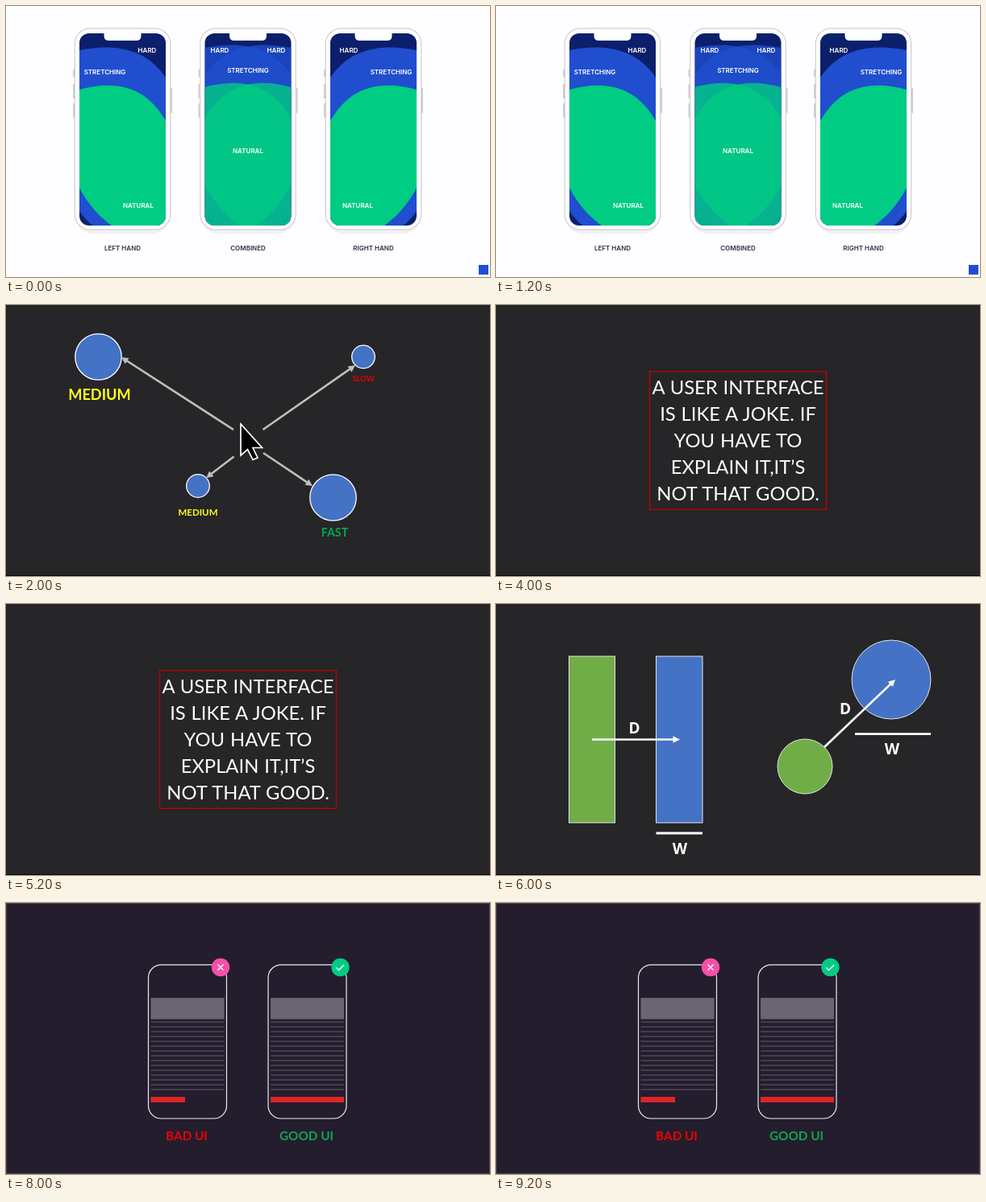
An HTML page that plays this animation: 600x337 px, repeating every 10 s.

```html
<!DOCTYPE html>
<html lang="en">
<head>
<meta charset="utf-8">
<title>Touch interface slides</title>
<style>
  html, body { margin: 0; width: 100%; height: 100%; overflow: hidden; background: #262527; }
  svg { display: block; width: 100vw; height: 100vh; }
  text { text-anchor: middle; font-family: Lato, Carlito, sans-serif; }
  .bold text { font-weight: 700; }
  .zones text { font: 600 8px Inter, sans-serif; }
  .sizes text { font: 700 19px "Open Sans", sans-serif; }
</style>
</head>
<body>
<svg id="stage" viewBox="0 0 600 337"></svg>
<script>
const SLIDE_MS = 2000;
const DARK = '#262527', BLUE = '#4472c4', GREEN = '#00cc83', ROYAL = '#204ecf';

const rect = (x, y, w, h, fill, more = '') =>
  `<rect x="${x}" y="${y}" width="${w}" height="${h}" fill="${fill}" ${more}/>`;
const circle = (x, y, r, fill, more = '') =>
  `<circle cx="${x}" cy="${y}" r="${r}" fill="${fill}" ${more}/>`;
const text = (x, y, label, fill = '#fff', more = '') =>
  `<text x="${x}" y="${y}" fill="${fill}" ${more}>${label}</text>`;
const path = (d, fill, more = '') => `<path d="${d}" fill="${fill}" ${more}/>`;
const line = (d, color, width) => path(d, 'none', `stroke="${color}" stroke-width="${width}"`);
const backdrop = color => rect(0, 0, 600, 337, color);
const darkBackdrop = backdrop(DARK) + rect(0, 336, 600, 1, '#080808');

// Straight arrow whose head ends exactly at (x2, y2).
function arrow(x1, y1, x2, y2, color, width) {
  const length = Math.hypot(x2 - x1, y2 - y1);
  const angle = Math.atan2(y2 - y1, x2 - x1) * 180 / Math.PI;
  return `<g transform="translate(${x1} ${y1}) rotate(${angle})">` +
    line(`M0 0H${length - 6}`, color, width) +
    path(`M${length} 0l-8.5 -4.3v8.6z`, color) + '</g>';
}

// Thumb zones, measured from the middle of the phone; side -1 mirrors them.
function zone(d, fill, side, opacity, dy) {
  return path(d, fill, `transform="translate(0 ${dy}) scale(${side} 1)" opacity="${opacity}"`);
}
const STRETCH = 'M-53.5 55C-14.5 47 27.5 50 53.5 89V280H-28C-38 273 -47 265 -53.5 255Z';
const NATURAL = 'M-53.5 104C-14.5 93 27.5 96 53.5 143V280H-2.5C-24.5 268 -42.5 248 -53.5 226Z';

function zonePhone(x, sides, caption, labels) {
  const both = sides.length > 1;
  const opacity = both ? 0.8 : 1, dy = both ? -3 : 0;
  const zones = [[STRETCH, ROYAL], [NATURAL, GREEN]]
    .map(([d, fill]) => sides.map(side => zone(d, fill, side, opacity, dy)).join('')).join('');
  const buttons = [[-61.5, 79, 9], [-61.5, 97, 18], [-61.5, 121, 18], [59.5, 102, 31]]
    .map(([bx, by, h]) => rect(bx, by, 2, h, '#cfcdd3')).join('');
  return `<g transform="translate(${x} 0)">` +
    rect(-57, 40, 114, 243, '#f1f0f4', 'rx="19"') + buttons +
    rect(-59.2, 27.8, 118.4, 250.4, '#fff', 'rx="19" stroke="#cfcdd3" stroke-width="1.2"') +
    `<g clip-path="url(#screen)">${rect(-54, 33, 108, 241, '#0c1f6a')}${zones}</g>` +
    path('M-23 33V37Q-23 43 -17 43H17Q23 43 23 37V33Z', '#fff') +
    labels.map(([lx, y, label]) => text(lx, y, label)).join('') +
    text(0, 304, caption, '#2b3246') + '</g>';
}

function zonesSlide() {
  const single = side => [[30.5 * side, 58, 'HARD'], [-22 * side, 85, 'STRETCHING'], [19.5 * side, 251, 'NATURAL']];
  return '<g class="zones">' + backdrop('#fefdff') +
    '<clipPath id="screen"><rect x="-53.5" y="34" width="107" height="239" rx="12"/></clipPath>' +
    zonePhone(144.5, [1], 'LEFT HAND', single(1)) +
    zonePhone(300, [1, -1], 'COMBINED',
      [[-35, 58, 'HARD'], [35, 58, 'HARD'], [0, 82.5, 'STRETCHING'], [0, 182.5, 'NATURAL']]) +
    zonePhone(455.5, [-1], 'RIGHT HAND', single(-1)) +
    rect(586, 322, 12, 12, ROYAL) + '</g>';
}

function speedSlide() {
  const target = (x, y, r) => circle(x, y, r, BLUE, 'stroke="#fff" stroke-width="1.3"');
  const label = (x, y, size, word, color) => text(x, y, word, color, `font-size="${size}"`);
  const ray = (...ends) => arrow(...ends, '#bfbfbf', 2.6);
  return '<g class="bold">' + darkBackdrop +
    target(114.5, 64.5, 28.7) + target(443, 64.5, 14.3) +
    target(238, 225, 14.3) + target(405.5, 239.5, 28.7) +
    ray(282, 155, 143, 65) + ray(318.5, 155, 433, 75) +
    ray(282.5, 188.5, 248, 215) + ray(319, 184, 380, 225) +
    path('M291 148V187L299.5 179.5L306 192.5L312 190L306 177.5H317.5Z', '#000',
      'stroke="#fff" stroke-width="1.7"') +
    label(116, 118, 18.2, 'MEDIUM', '#ffff1a') + label(443, 95, 9.5, 'SLOW', '#e60000') +
    label(238, 261.5, 11.5, 'MEDIUM', '#ffff1a') + label(407.5, 288, 14.2, 'FAST', '#00a84f') + '</g>';
}

function quoteSlide() {
  const lines = ['A USER INTERFACE', 'IS LIKE A JOKE. IF', 'YOU HAVE TO', 'EXPLAIN IT,IT’S', 'NOT THAT GOOD.'];
  return '<g font-size="23.8" word-spacing="0.8">' + darkBackdrop +
    rect(190.5, 82.8, 219, 171.4, 'none', 'stroke="#c80000" stroke-width="1.3"') +
    lines.map((words, i) => text(300, 111 + 33 * i, words)).join('') + '</g>';
}

function sizesSlide() {
  const edge = 'stroke="#e4e4e4"';
  return '<g class="sizes">' + darkBackdrop +
    rect(90.5, 65, 57, 207, '#70ad47', edge) + rect(198.5, 65, 57.5, 207, BLUE, edge) +
    arrow(119, 168.5, 228, 168.5, '#fff', 2.7) + line('M198.5 285H256', '#fff', 2.8) +
    text(171.5, 160.5, 'D') + text(228, 311, 'W') +
    circle(383, 202, 34, '#70ad47', edge) + circle(490, 94, 49, BLUE, edge) +
    arrow(407, 178, 495, 94, '#fff', 2.7) + line('M445 161.7H539', '#fff', 2.8) +
    text(433, 137, 'D') + text(491, 186.5, 'W') + '</g>';
}

function pagePhone(x, barWidth, badge, mark, caption, color) {
  const rows = Array.from({ length: 15 }, (_, i) => `M3.5 ${148 + 6 * i}h91`).join('');
  return `<g transform="translate(${x} 0)">` +
    rect(0.5, 76.8, 97, 191.2, 'none', 'rx="16" stroke="#ebebee" stroke-width="1.2"') +
    rect(3.5, 118, 91, 26.5, '#6a6571') + line(rows, '#625e6b', 1.2) +
    rect(3.5, 241, barWidth, 7, '#dc2528') +
    circle(90, 80, 11.2, badge) + line(mark, '#fff', 1.4) +
    text(48, 295, caption, color, 'font-size="15.3"') + '</g>';
}

function compareSlide() {
  return '<g class="bold">' + backdrop('#231d2e') +
    rect(0.5, 0.5, 599, 336, 'none', 'stroke="#49454f"') +
    pagePhone(176, 42.5, '#f74fa8', 'M86.5 76.5l7 7m0 -7l-7 7', 'BAD UI', '#f00000') +
    pagePhone(324.5, 91, GREEN, 'M84.8 80.3l3.2 3.2l6.6 -6.6', 'GOOD UI', '#10a452') + '</g>';
}

const stage = document.getElementById('stage');
stage.innerHTML = [zonesSlide, speedSlide, quoteSlide, sizesSlide, compareSlide]
  .map(draw => `<g class="slide">${draw()}</g>`).join('');
const slides = [...stage.querySelectorAll('.slide')];
const start = performance.now();

function show() {
  const current = Math.floor((performance.now() - start) / SLIDE_MS) % slides.length;
  slides.forEach((slide, i) => slide.setAttribute('visibility', i === current ? 'visible' : 'hidden'));
  requestAnimationFrame(show);
}
show();
</script>
</body>
</html>
```
